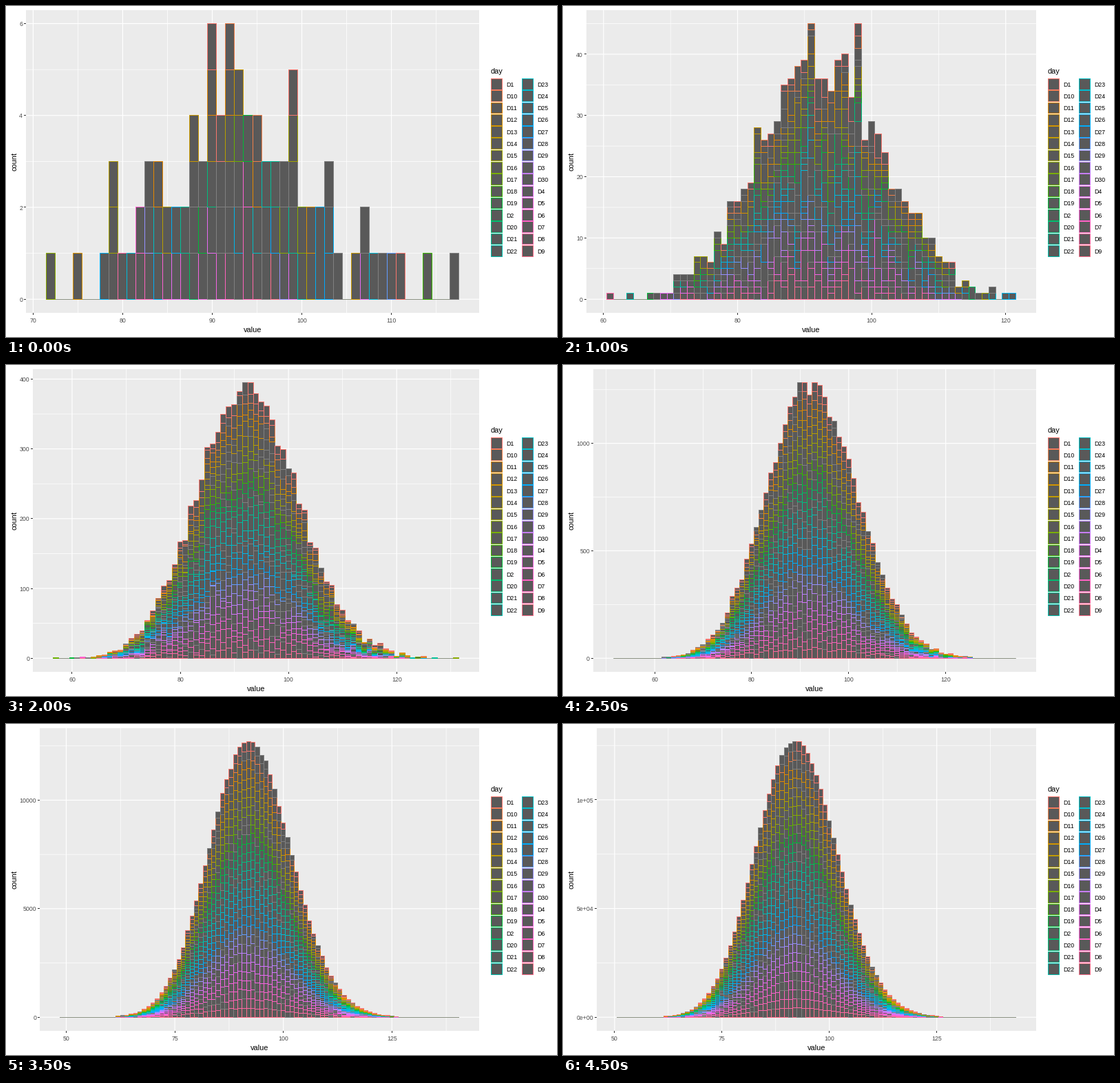
A matplotlib script that plays this animation: 800x480 px, repeating every 5000 ms.

```python
import math

import numpy as np
import matplotlib.pyplot as plt
from matplotlib.animation import FuncAnimation
from matplotlib.collections import LineCollection, PolyCollection
from matplotlib.patches import Rectangle

plt.rcParams["font.family"] = "Liberation Sans"

PX = 0.72                      # points per pixel at 100 dpi
TOP, BOTTOM, RIGHT = 5.5, 445, 687
BASE, PEAK = 425.2, 25.5
KEY_TOP, KEY, INSET = 104.8, 17.28, 0.85
FILL, GREY = "#595959", (0.5, 0.5, 0.5, 1)
DAYS = sorted(f"D{i}" for i in range(1, 31))
TRIALS, CHANCE = 2314, 0.04    # each value is a binomial draw

# first bin, last bin, tallest bin, its count; draws grow about threefold
STEPS = [
    (72, 117, 90, 6),
    (71, 121, 91, 23),
    (61, 121, 98, 45),
    (62, 131, 94, 132),
    (57, 131, 93, 395),
    (52, 134, 93, 1283),
    (54, 136, 92, 3820),
    (49, 140, 92, 12700),
    (52, 145, 92, 38050),
    (51, 143, 92, 126800),
]


def hue_color(deg, lum=65, chroma=100):
    """Polar LUV to sRGB."""
    h = math.radians(deg)
    u = chroma * math.cos(h) / (13 * lum) + 0.1978
    v = chroma * math.sin(h) / (13 * lum) + 0.4683
    y = ((lum + 16) / 116) ** 3
    x = 9 * y * u / (4 * v)
    z = y * (12 - 3 * u - 20 * v) / (4 * v)
    lin = (3.2406 * x - 1.5372 * y - 0.4986 * z,
           -0.9689 * x + 1.8758 * y + 0.0415 * z,
           0.0557 * x - 0.2040 * y + 1.0570 * z)
    rgb = []
    for c in lin:
        c = 12.92 * c if c <= 0.0031 else 1.055 * c ** (1 / 2.4) - 0.055
        rgb.append(min(1, max(0, c)))
    return (*rgb, 1)


COLORS = [hue_color(15 + 12 * i) for i in range(30)]


def pmf(k):
    return math.exp(math.lgamma(TRIALS + 1) - math.lgamma(k + 1)
                    - math.lgamma(TRIALS - k + 1) + k * math.log(CHANCE)
                    + (TRIALS - k) * math.log(1 - CHANCE))


def bin_counts(k, rng):
    """Expected bar heights with sampling noise that fades as draws grow."""
    lo, hi, mode, top = STEPS[k]
    per_day = (10 if k % 2 else 3) * 10 ** (k // 2)
    expect = np.array([30 * per_day * pmf(v) for v in range(lo, hi + 1)])
    noise = 0.7 * np.sqrt(expect) * rng.standard_normal(len(expect))
    counts = np.clip(np.rint(expect + noise), 0, top).astype(int)
    counts[[0, -1]] = np.maximum(counts[[0, -1]], 1)
    counts[mode - lo] = top
    return counts


def nice_step(span):
    """Smallest 1-2-5 step that cuts the span into few parts."""
    unit = 10 ** int(math.log10(span) - 1)
    return next(m * unit for m in (1, 2, 5, 10, 20, 50)
                if span / (m * unit) < 5.5)


def ticks(step, lo, hi, offset=0):
    first, last = math.ceil(lo / step - offset), math.floor(hi / step - offset)
    return [(i + offset) * step for i in range(first, last + 1)]


def crisp(v):
    return math.floor(v) + 0.5


def box(x0, y0, x1, y1):
    return [(x0, y0), (x1, y0), (x1, y1), (x0, y1)]


fig = plt.figure(figsize=(8, 4.8), dpi=100, facecolor="white")
ax = fig.add_axes([0, 0, 1, 1])


def label(x, y, text, size=8.8, color="black", **kw):
    ax.text(x, y, text, fontsize=size * PX, color=color, va="baseline", **kw)


def lines(segs, color, width):
    ax.add_collection(LineCollection(segs, colors=[color], snap=False,
                                     linewidths=width * PX,
                                     capstyle="butt"))


def boxes(shapes, edges):
    ax.add_collection(PolyCollection(shapes, facecolors=FILL, edgecolors=edges,
                                     linewidths=PX, snap=False, zorder=3))


def draw_legend():
    label(704, 98, "day", 11)
    keys = []
    for i, day in enumerate(DAYS):
        col, row = divmod(i, 15)
        x = 704 + 45 * col
        y = KEY_TOP + row * KEY
        keys.append(box(x + 0.5, crisp(y + INSET - 0.05),
                        x + 16.5, crisp(y + KEY - INSET - 0.05)))
        label(x + 22.3, y + KEY / 2 + 3.2, day)
    for x in (704, 749):
        ax.add_patch(Rectangle((x, KEY_TOP), KEY, 15 * KEY, fc="#F2F2F2",
                               lw=0))
    boxes(keys, COLORS)


def draw_axes(sx, sy, left, xs, ys, xr, yr, sci):
    ax.add_patch(Rectangle((left, TOP), RIGHT - left, BOTTOM - TOP,
                           fc="#EBEBEB", lw=0))
    for offset, width in ((0.5, 0.7), (0, 1.2)):
        lines([[(sx(t), TOP), (sx(t), BOTTOM)] for t in ticks(xs, *xr, offset)]
              + [[(left, sy(t)), (RIGHT, sy(t))]
                 for t in ticks(ys, *yr, offset)], "white", width)
    for t in ticks(xs, *xr):
        x = sx(t)
        lines([[(crisp(x), 445), (crisp(x), 448)]], "#333333", 1)
        label(x, 459, str(t), color="#4D4D4D", ha="center")
    for t in ticks(ys, *yr):
        y = sy(t)
        lines([[(left - 3, crisp(y)), (left, crisp(y))]], "#333333", 1)
        label(left - 5, y + 3.6, f"{t:.0e}" if sci else str(t),
              color="#4D4D4D", ha="right")
    label((left + RIGHT) / 2, 472.8, "value", 11, ha="center")
    label(15.8, 225.5, "count", 11, ha="center", rotation=90,
          rotation_mode="anchor")


def draw(k):
    ax.clear()
    ax.set(xlim=(0, 800), ylim=(480, 0))
    ax.axis("off")
    lo, hi, _, top = STEPS[k]
    rng = np.random.default_rng(40 + k)
    counts = bin_counts(k, rng)
    span = hi - lo + 1
    x_lo, x_hi = lo - 0.5 - span / 20, hi + 0.5 + span / 20
    xs, ys = 25 if span > 90 else nice_step(span), nice_step(top)
    sci = top >= 100000
    # the panel gives way to wider count labels
    left = 24 + 5 * min(5, len(str(int(top * 1.05) // ys * ys)))

    def sx(v):
        return left + (v - x_lo) / (x_hi - x_lo) * (RIGHT - left)

    def sy(v):
        return BASE - v / top * (BASE - PEAK)

    draw_axes(sx, sy, left, xs, ys, (x_lo, x_hi),
              (-0.05 * top, 1.05 * top), sci)

    base = crisp(BASE)
    lines([[(sx(lo - 0.5), base), (sx(hi + 0.5), base)]], "#8A9082", 1)

    # split every visible bar over the days, last day at the bottom
    shapes, edges = [], []
    for i, total in enumerate(counts):
        if BASE - sy(total) < 1:
            continue
        parts = rng.multinomial(total, [1 / 30] * 30)
        muted = rng.random(30) < 0.2
        x0, x1 = crisp(sx(lo + i - 0.5)), crisp(sx(lo + i + 0.5))
        y = 0
        for d in reversed(range(30)):
            if parts[d]:
                shapes.append(box(x0, crisp(sy(y)),
                                  x1, crisp(sy(y + parts[d]))))
                edges.append(GREY if muted[d] else COLORS[d])
                y += parts[d]
    boxes(shapes, edges)
    draw_legend()
    return []


anim = FuncAnimation(fig, draw, frames=len(STEPS), interval=500,
                     init_func=lambda: [], repeat=True, repeat_delay=0)
plt.show()
```
